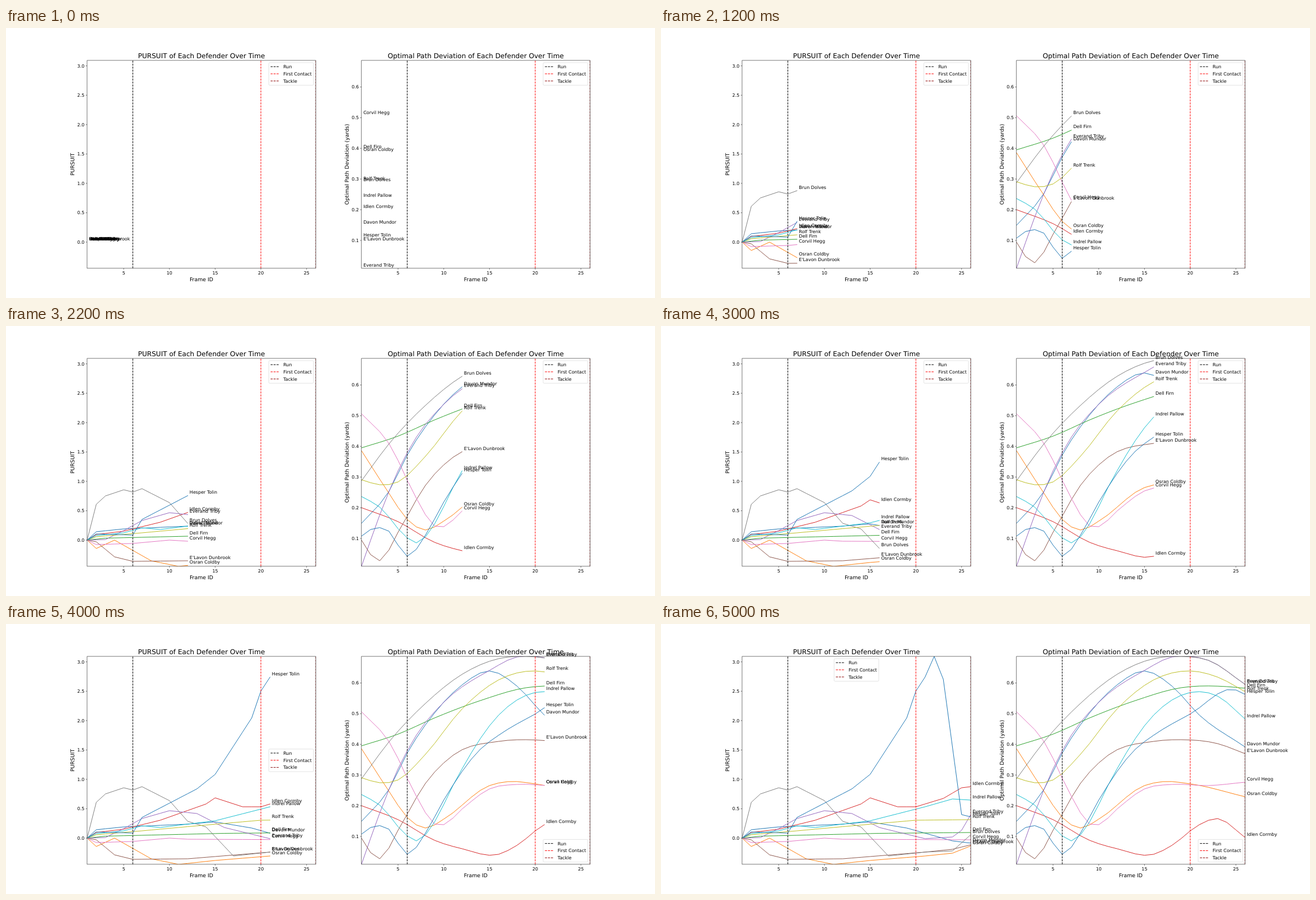
Recreate the animation shown at these times as an HTML page. Size 1159 by 483 pixels, loop 5200 ms.

```html
<!DOCTYPE html>
<html lang="en">
<head>
<meta charset="utf-8">
<title>Defender charts</title>
<style>
  html, body { margin: 0; width: 100%; height: 100%; overflow: hidden; background: #fff; }
  svg { display: block; width: 100vw; height: 100vh; }
  text { font: 8.05px "DejaVu Sans", sans-serif; text-rendering: geometricPrecision; white-space: pre; }
  .title { font-size: 12.07px; }
  .axis { font-size: 9.39px; }
  .mid { text-anchor: middle; }
  .end { text-anchor: end; }
  .series { fill: none; stroke-width: 1; stroke-linejoin: round; stroke-linecap: square; }
  .dash { stroke-width: 1; stroke-dasharray: 3.72 1.61; }
  .frame { fill: none; stroke: #000; stroke-width: .54; }
  .box { fill: #fff; fill-opacity: .8; stroke: #ccc; stroke-opacity: .8; stroke-width: .67; }
</style>
</head>
<body>
<svg id="stage" viewBox="0 0 1159 483"></svg>
<script>
const STEPS = 26, STEP_MS = 200;
const TOP = 57.96, BOTTOM = 429.87, WIDTH = 408.27, DX = WIDTH / (STEPS - 1);
const LABEL_GAP = 3.35, LEGEND_W = 79.8, LEGEND_H = 40.4, LEGEND_PAD = 4.02;
const ZERO = 383;
const EVENTS = [["Run", 6, "#000"], ["First Contact", 20, "#f00"], ["Tackle", 26, "#8b0000"]];

// Key points are step, y pairs at the bends of a curve.
// Pursuit starts at zero and runs straight between its bends; deviation is smooth.
const players = [];
const player = (name, color, pursuit, deviation) =>
  players.push({ name, color, pursuit: curve([1, ZERO, ...pursuit], false), deviation: curve(deviation, true) });

player("Davon Mundor", "#1f77b4",
  [2, 368, 5, 363, 12, 358, 15, 354, 19, 365, 24, 388, 26, 392],
  [1, 353, 4, 296, 6, 231, 9, 159, 12, 109, 15, 84, 18, 111, 21, 163, 26, 220]);
player("Osran Coldby", "#ff7f0e",
  [2, 398, 4, 383, 8, 420, 11, 430, 15, 423, 21, 415, 24, 410, 26, 397],
  [1, 223, 4, 299, 6, 346, 8, 365, 10, 349, 15, 289, 17, 282, 20, 286, 26, 309]);
player("Dell Firn", "#2ca02c",
  [3, 379.5, 16, 374.5, 26, 373],
  [1, 218, 5, 197, 9, 168, 14, 137, 19, 114, 24, 112, 26, 115]);
player("Idlen Cormby", "#d62728",
  [2, 373, 5, 367, 9, 351, 14, 322, 15, 311, 18, 327, 20, 327, 23, 312, 25, 293, 26, 291],
  [1, 325, 5, 350, 9, 387, 12, 402, 16, 412, 18, 396, 21, 359, 23, 348, 26, 382]);
player("Everand Triby", "#9467bd",
  [3, 382, 5, 366, 7, 348, 10, 334, 13, 339, 16, 364, 21, 384, 24, 381, 25, 369, 26, 341],
  [1, 430, 3, 338, 5, 259, 7, 199, 10, 140, 15, 83, 18, 59, 20, 58, 22, 65, 26, 108]);
player("E'Lavon Dunbrook", "#8c564b",
  [2, 386, 4, 413, 6, 421, 12, 420, 21, 408, 24, 403, 26, 395],
  [1, 383, 2, 409, 3, 420, 5, 369, 8, 285, 11, 235, 16, 210, 19, 207, 23, 214, 26, 232]);
player("Corvil Hegg", "#e377c2",
  [2, 391, 6, 389, 10, 383, 12, 385, 26, 386],
  [1, 157, 4, 210, 7, 308, 9, 358, 10, 359, 12, 331, 15, 295, 18, 287, 22, 289, 26, 283]);
player("Brun Dolves", "#7f7f7f",
  [2, 319, 3, 304, 5, 293, 6, 297, 7, 291, 10, 316, 12, 353, 14, 363, 17, 415, 21, 408, 24, 406, 26, 377],
  [1, 277, 4, 211, 8, 142, 12, 90, 16, 62, 19, 58, 22, 65, 26, 108]);
player("Rolf Trenk", "#bcbd22",
  [2, 377, 7, 370, 12, 362.5, 20, 351, 26, 350],
  [1, 275, 3, 284, 5, 279, 8, 233, 12, 152, 16, 100, 20, 84, 23, 95, 26, 121]);
player("Indrel Pallow", "#17becf",
  [2, 375, 5, 370, 7, 361, 9, 364, 15, 352, 21, 327, 24, 313, 26, 315],
  [1, 305, 3, 324, 6, 379, 7, 388, 9, 354, 11, 289, 16, 163, 18, 136, 21, 121, 23, 129, 26, 170]);
player("Hesper Tolin", "#1f77b4",
  [2, 372, 6, 374, 7, 346, 13, 295, 15, 269, 19, 168, 20, 120, 21, 95, 22, 58, 23, 99, 25, 341, 26, 345],
  [1, 376, 2, 364, 4, 367, 6, 412, 8, 374, 10, 315, 14, 224, 16, 199, 20, 161, 25, 118, 26, 126]);

// One y per step through the key points.
function curve(keys, smooth) {
  const xs = keys.filter((_, i) => i % 2 === 0), ys = keys.filter((_, i) => i % 2);
  const last = xs.length - 1;
  const chord = i => (ys[i + 1] - ys[i]) / (xs[i + 1] - xs[i]);
  const slope = i => {
    if (i === 0 || i === last) return chord(Math.min(i, last - 1));
    const before = xs[i] - xs[i - 1], after = xs[i + 1] - xs[i];
    return (chord(i - 1) * after + chord(i) * before) / (before + after);
  };
  return Array.from({ length: STEPS }, (_, n) => {
    const i = Math.max(xs.findIndex(x => x >= n + 1) - 1, 0);
    const h = xs[i + 1] - xs[i], t = (n + 1 - xs[i]) / h, dy = ys[i + 1] - ys[i];
    if (!smooth) return ys[i] + dy * t;
    return ys[i] + dy * t * t * (3 - 2 * t) + h * t * (1 - t) * ((1 - t) * slope(i) - t * slope(i + 1));
  });
}

function add(parent, tag, attrs = {}, text) {
  const node = document.createElementNS("http://www.w3.org/2000/svg", tag);
  for (const key in attrs) node.setAttribute(key, attrs[key]);
  if (text !== undefined) node.textContent = text;
  parent.append(node);
  return node;
}

function addLegend(parent) {
  const g = add(parent, "g");
  add(g, "rect", { class: "box", width: LEGEND_W, height: LEGEND_H, rx: 1.6 });
  EVENTS.forEach(([label, , color], i) => {
    const y = 7.2 + 12.8 * i;
    add(g, "path", { class: "dash", stroke: color, d: `M3.22 ${y}h16.1` });
    add(g, "text", { x: 25.8, y: y + 2.9 }, label);
  });
  return g;
}

function addPanel({ id, left, title, yLabel, ticks, legendSpot }) {
  const g = add(stage, "g"), center = left + WIDTH / 2, middle = (TOP + BOTTOM) / 2;
  const area = { x: left, y: TOP, width: WIDTH, height: BOTTOM - TOP };
  const xAt = step => left + (step - 1) * DX;
  add(add(g, "clipPath", { id }), "rect", area);
  add(g, "rect", { ...area, fill: "#fff" });

  const plot = add(g, "g", { "clip-path": `url(#${id})` });
  const lines = players.map(p => add(plot, "path", { class: "series", stroke: p.color }));
  for (const [, step, color] of EVENTS)
    add(plot, "path", { class: "dash", stroke: color, d: `M${xAt(step)} ${BOTTOM}V${TOP}` });

  add(g, "rect", { ...area, class: "frame" });
  for (let step = 5; step <= 25; step += 5) {
    add(g, "path", { class: "frame", d: `M${xAt(step)} ${BOTTOM}v2.35` });
    add(g, "text", { class: "mid", x: xAt(step), y: 441.2 }, step);
  }
  for (let i = 0; i < ticks.count; i++) {
    const y = ticks.y - i * ticks.gap;
    add(g, "path", { class: "frame", d: `M${left} ${y}h-2.35` });
    add(g, "text", { class: "end", x: left - 4.7, y: y + 2.95 }, (ticks.first + i * ticks.by).toFixed(1));
  }
  add(g, "text", { class: "axis mid", x: center, y: 453.3 }, "Frame ID");
  add(g, "text", { class: "axis mid", transform: `translate(${left - 22.4} ${middle}) rotate(-90)` }, yLabel);
  add(g, "text", { class: "title mid", x: center, y: TOP - LEGEND_PAD }, title);

  const labels = players.map(p => add(g, "text", {}, p.name));
  const legend = addLegend(g);
  const spots = {
    right: left + WIDTH - LEGEND_PAD - LEGEND_W, center: center - LEGEND_W / 2,
    top: TOP + LEGEND_PAD, middle: middle - LEGEND_H / 2, bottom: BOTTOM - LEGEND_PAD - LEGEND_H
  };

  return step => {
    players.forEach((p, n) => {
      const ys = p[id].slice(0, step);
      const points = ys.map((y, i) => `${xAt(i + 1).toFixed(2)} ${y.toFixed(2)}`);
      lines[n].setAttribute("d", step > 1 ? "M" + points.join("L") : "");
      labels[n].setAttribute("x", xAt(step) + LABEL_GAP);
      labels[n].setAttribute("y", ys[step - 1] - LABEL_GAP);
    });
    const [h, v] = legendSpot(step);
    legend.setAttribute("transform", `translate(${spots[h]} ${spots[v]})`);
  };
}

const stage = document.getElementById("stage");
const panels = [
  addPanel({
    id: "pursuit", left: 144.88, title: "PURSUIT of Each Defender Over Time", yLabel: "PURSUIT",
    ticks: { y: ZERO, gap: 52.55, count: 7, first: 0, by: .5 },
    legendSpot: step => step < 21 ? ["right", "top"] : step < 25 ? ["right", "middle"] : ["center", "top"]
  }),
  addPanel({
    id: "deviation", left: 634.8, title: "Optimal Path Deviation of Each Defender Over Time",
    yLabel: "Optimal Path Deviation (yards)",
    ticks: { y: 380, gap: 54.9, count: 6, first: .1, by: .1 },
    legendSpot: step => ["right", step < 21 ? "top" : "bottom"]
  })
];

const start = performance.now();
let shown = 0;
function draw() {
  const step = Math.floor((performance.now() - start) / STEP_MS) % STEPS + 1;
  if (step !== shown) panels.forEach(show => show(step));
  shown = step;
  requestAnimationFrame(draw);
}
draw();
</script>
</body>
</html>
```
